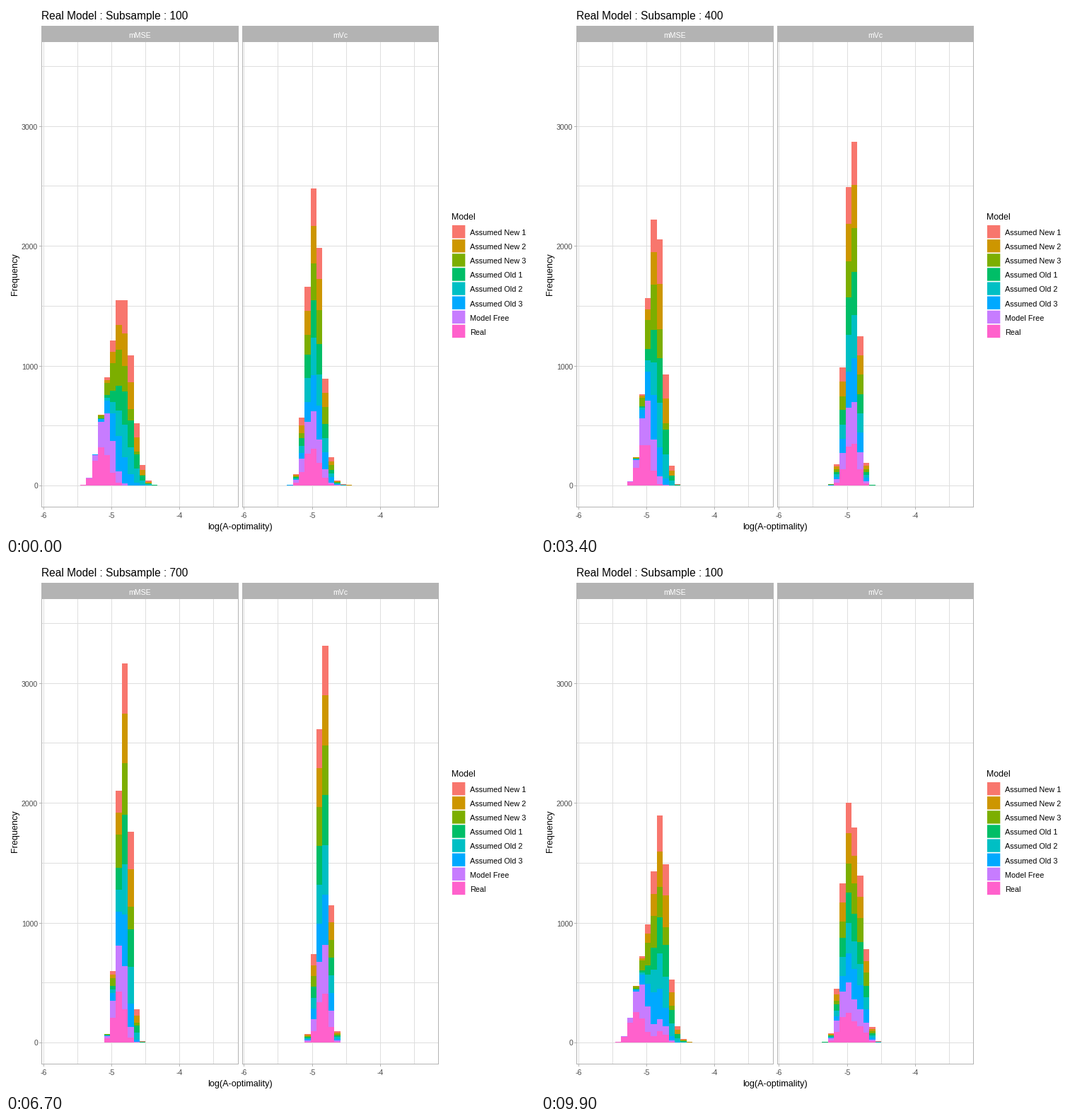
These frames come from a looping animation (748x748 px, 10 s). A matplotlib script:

```python
import matplotlib.pyplot as plt
import numpy as np
from matplotlib.animation import FuncAnimation
from matplotlib.collections import PolyCollection
from matplotlib.patches import Rectangle

SIZE, DPI = 748, 100
FRAMES, INTERVAL = 100, 100
plt.rcParams["font.family"] = "Liberation Sans"

# Models from the top of each stack to the bottom: name, colour, group
MODELS = [
    ("Assumed New 1", "#F8766D", "wide"),
    ("Assumed New 2", "#CD9600", "wide"),
    ("Assumed New 3", "#7CAE00", "mid"),
    ("Assumed Old 1", "#00BE67", "wide"),
    ("Assumed Old 2", "#00BFC4", "wide"),
    ("Assumed Old 3", "#00A9FF", "mid"),
    ("Model Free", "#C77CFF", "free"),
    ("Real", "#FF61CC", "real"),
]
STACK = MODELS[::-1]

# Panel -> group -> centre, its drift per 100 samples,
# and the early extra shift and spread, all in bins
CURVES = {
    "mMSE": {
        "real": (2.16, 0.56, 0.47, 0.02),
        "free": (3.19, 0.455, 0.52, -0.08),
        "mid": (4.74, 0.295, 0.92, 0.14),
        "wide": (6.20, 0.141, 0.78, 0.24),
    },
    "mVc": {
        "real": (4.00, 0.37, 0.41, 0.05),
        "free": (4.00, 0.37, 0.41, 0.05),
        "mid": (4.18, 0.352, 0.92, 0.05),
        "wide": (4.15, 0.355, 0.72, 0.05),
    },
}
BINS = np.arange(-2, 16)
STATES = 9
RUNS = 1000


def bell(centre, drift, shift, spread, s):
    """One model's histogram: a slightly skewed bell that narrows with s."""
    early = np.exp(-1.2 * (s - 1))
    sd = 1.24 - 0.046 * s + spread * early
    skew = 0.08 * (1 - 1.6 * early)
    mode = centre + drift * s + shift * early + 1.6 * skew * sd
    x = BINS - mode
    side = sd * (1 - skew * np.sign(x))
    row = np.exp(-0.5 * (x / side) ** 2)
    row += 0.02 * early * np.exp(-0.35 * x) * (x > 0)
    return RUNS * row / row.sum()


def counts(panel, s):
    return [bell(*CURVES[panel][group], s) for _, _, group in STACK]


HEIGHTS = np.array([[counts(p, s) for p in CURVES]
                    for s in range(1, STATES + 1)])

# Each state holds, then moves on to the next one
ORDER = np.arange(STATES)
STARTS = 6 + 11 * ORDER + np.minimum(ORDER, 2)
STEPS = np.where(ORDER < 2, 6, 5)

# Stage geometry in pixels
PANELS = [("mMSE", 50, 328, 53.2), ("mVc", 334, 611, 336.9)]
TOP, BOTTOM = 50, 708
UNIT_X, UNIT_Y, ZERO_Y = 96.1, 0.1694, 678.4
BIN_X, BIN_W = 51.9, 8.38
KEY, PITCH = 18.4, 20.1
GRID, FRAME, TICK = "#DEDEDE", "#B3B3B3", "#4D4D4D"

fig = plt.figure(figsize=(SIZE / DPI, SIZE / DPI), dpi=DPI, facecolor="white")
ax = fig.add_axes([0, 0, 1, 1])
ax.set(xlim=(0, SIZE), ylim=(SIZE, 0))
ax.axis("off")


def text(x, y, s, px, color="black", va="baseline", **kw):
    return ax.text(x, y, s, fontsize=px * 72 / DPI, color=color, va=va, **kw)


def box(x, y, w, h, color, z=1, smooth=False):
    ax.add_patch(Rectangle((x, y), w, h, fc=color, lw=0, zorder=z,
                           antialiased=smooth, snap=not smooth))


def value_y(v):
    return ZERO_Y - v * UNIT_Y


for name, left, right, origin in PANELS:
    width, height = right - left + 1, BOTTOM - TOP + 1
    for v in range(0, 4000, 500):
        box(left, int(value_y(v)), width, 1, GRID)
    for i in range(6):
        x = int(origin + i * UNIT_X / 2)
        box(x, TOP, 1, height, GRID)
        if i % 2 == 0:
            box(x, BOTTOM, 1, 4, FRAME)
            text(x + 0.5, 724, str(i // 2 - 6), 10.6, TICK, ha="center")
    for y in (TOP, BOTTOM):
        box(left, y, width, 1, FRAME, 5)
    for x in (left, right):
        box(x, TOP, 1, height, FRAME, 5)
    box(left, 28, width, TOP - 28, FRAME, 5)
    text((left + right) / 2, 45, name, 10.5, "white", ha="center", zorder=6)

for v in range(0, 4000, 1000):
    y = int(value_y(v))
    box(47, y, 3, 1, FRAME)
    text(45, y + 4.5, str(v), 10.5, TICK, ha="right")

title = text(50.5, 19, "", 15.5)
text(331, 740, "log(A-optimality)", 12.6, ha="center")
text(13.5, 379, "Frequency", 12.6, va="center", ha="center", rotation=90)

text(630, 302, "Model", 12.4)
for i, (name, color, _) in enumerate(MODELS):
    box(630.9, 310 + PITCH * i, KEY, KEY, color, smooth=True)
    text(656, 324 + PITCH * i, name, 10.9)

bars = PolyCollection([], facecolors=[c for _, c, _ in STACK for _ in BINS] * 2,
                      edgecolors="none", linewidths=0, antialiaseds=False,
                      zorder=3)
ax.add_collection(bars, autolim=False)


def bar_verts(data):
    verts = []
    for (_, _, _, origin), rows in zip(PANELS, data):
        x0, x1 = (np.round(origin + BIN_X + (BINS + d) * BIN_W) for d in (0, 1))
        ends = np.vstack([np.zeros(len(BINS)), rows.cumsum(axis=0)])
        ys = np.round(value_y(ends))
        for low, high in zip(ys[:-1], ys[1:]):
            verts += [[(a, l), (b, l), (b, h), (a, h)]
                      for a, b, l, h in zip(x0, x1, low, high)]
    return verts


def update(frame):
    pos = np.clip((frame - STARTS + 1) / STEPS, 0, 1).sum()
    i, t = int(pos), pos % 1
    data = HEIGHTS[i % STATES] * (1 - t) + HEIGHTS[(i + 1) % STATES] * t
    bars.set_verts(bar_verts(data))
    nearest = int(pos + 0.5) % STATES
    title.set_text(f"Real Model : Subsample : {100 * (nearest + 1)}")
    return bars, title


anim = FuncAnimation(fig, update, frames=FRAMES, interval=INTERVAL,
                     repeat=True, repeat_delay=0, blit=False)
plt.show()
```
